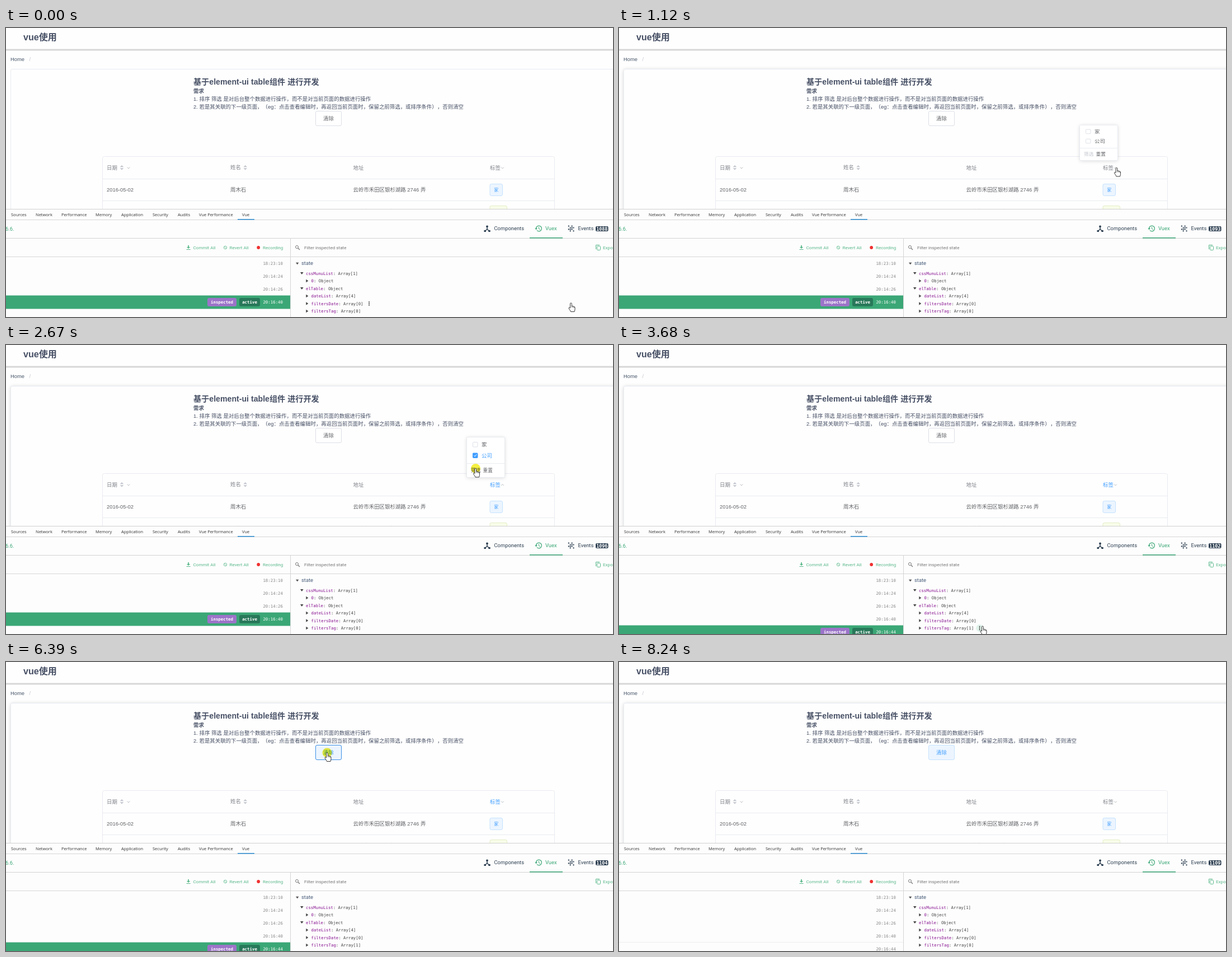
Animation, 1085 px wide and 516 px high, one loop 9110 ms. Source, as an HTML page with a canvas:

```html
<!DOCTYPE html>
<html lang="zh-CN">
<head>
<meta charset="utf-8">
<title>vue使用</title>
<style>
html, body { margin: 0; width: 100%; height: 100%; overflow: hidden; background: #fefefe; }
canvas { display: block; }
</style>
</head>
<body>
<canvas id="stage" width="1085" height="516"></canvas>
<script>
const W = 1085, H = 516, LOOP = 9110;
const ctx = document.getElementById('stage').getContext('2d');
const SANS = '"Liberation Sans", "Noto Sans CJK SC", sans-serif';
const UI = '"Open Sans", sans-serif';
const ROBOTO = 'Roboto, sans-serif';
const MONO = '"DejaVu Sans Mono", monospace';
const PAGE = '#fefefe', INK = '#475065', BODY = '#606266', HEAD = '#80838a';
const BLUE = '#409eff', GREEN = '#3ba776', SOFT_GREEN = '#5bb98c', NAVY = '#2c3e50';
const NAME = '周木石', ADDRESS = '云岭市禾田区银杉湖路 2746 弄';

// Moments of the interaction, in ms
const OPEN = 970, CHECK = 2050, COMMIT = 2900, CLEAR = 6470;

// Pointer track: time, x, y
const TRACK = [
  [70, 1010, 491], [640, 932, 321], [970, 889.5, 249.5],
  [1350, 889.5, 249.5], [1900, 839.5, 196.5],
  [2090, 839.5, 196.5], [2220, 840, 215], [2340, 840, 215], [2450, 839.5, 220.5],
  [3060, 839.5, 220.5], [3370, 655, 496], [3530, 650, 502],
  [3760, 650, 502], [4370, 962, 323], [4400, 962, 323], [4830, 881, 251],
  [4950, 881, 251], [5460, 574, 162], [6690, 574, 162],
  [7540, 625, 481], [7690, 625, 481], [8230, 703, 519]
];
const CLICKS = [[1970, 2050], [2660, 2900], [6380, 6470]];
const COUNTS = [
  [0, 1088], [300, 1089], [450, 1091], [970, 1092], [1050, 1093], [1980, 1094],
  [2050, 1096], [2900, 1098], [2990, 1100], [3150, 1102], [4450, 1103],
  [4600, 1104], [6540, 1106], [6770, 1108], [6920, 1109]
];

const HAND = new Path2D('M-1.5 9V1.3Q-1.5 0 -.1 0T1.3 1.3V5.5Q3 4.8 3.6 6Q5 5.4 5.6 6.7Q7.2 6.6 7 8.5V11Q7 12.5 6 15.5H-.5Q-1.5 13 -3.8 10Q-4.5 8.2 -3.3 8Q-2.4 8 -1.5 9Z');
const ARROW = new Path2D('M0 0V11.5L2.7 9L4.6 13.6L6.4 12.8L4.5 8.4H8Z');

const between = (v, a, b) => v >= a && v < b;

function pointer(t) {
  if (t <= TRACK[0][0]) return { x: TRACK[0][1], y: TRACK[0][2] };
  for (let i = 1; i < TRACK.length; i++) {
    const [t0, x0, y0] = TRACK[i - 1], [t1, x1, y1] = TRACK[i];
    if (t > t1) continue;
    const p = (t - t0) / (t1 - t0), e = p * p * (3 - 2 * p);
    return { x: x0 + (x1 - x0) * e, y: y0 + (y1 - y0) * e };
  }
  return { x: 703, y: 560 };
}

function rect(x, y, w, h, color) {
  ctx.fillStyle = color;
  ctx.fillRect(x, y, w, h);
}

function box(x, y, w, h, r, fill, border) {
  ctx.beginPath();
  ctx.roundRect(x, y, w, h, r);
  if (fill) { ctx.fillStyle = fill; ctx.fill(); }
  if (border) { ctx.strokeStyle = border; ctx.lineWidth = 1; ctx.stroke(); }
}

function text(str, x, y, size, color, font = SANS, weight = 400, align = 'left') {
  ctx.font = `${weight} ${size}px ${font}`;
  ctx.fillStyle = color;
  ctx.textAlign = align;
  ctx.fillText(str, x, y);
}

function line(color, width, ...pts) {
  ctx.strokeStyle = color;
  ctx.lineWidth = width;
  ctx.beginPath();
  for (let i = 0; i < pts.length; i += 2) ctx.lineTo(pts[i], pts[i + 1]);
  ctx.stroke();
}

function poly(color, ...pts) {
  ctx.fillStyle = color;
  ctx.beginPath();
  for (let i = 0; i < pts.length; i += 2) ctx.lineTo(pts[i], pts[i + 1]);
  ctx.fill();
}

function dot(x, y, r, color) {
  ctx.fillStyle = color;
  ctx.beginPath();
  ctx.arc(x, y, r, 0, 7);
  ctx.fill();
}

function ring(x, y, r, color, width = 1, from = 0, to = 2 * Math.PI) {
  ctx.strokeStyle = color;
  ctx.lineWidth = width;
  ctx.beginPath();
  ctx.arc(x, y, r, from, to);
  ctx.stroke();
}

function sorter(x) {
  poly('#c0c4cc', x - 3.3, 248.2, x, 245, x + 3.3, 248.2);
  poly('#c0c4cc', x - 3.3, 250.2, x, 253.4, x + 3.3, 250.2);
}

function chevron(x, up) {
  const d = up ? -1.2 : 1.2;
  line('#a8acb3', 0.8, x - 2.3, 249.8 - d, x, 249.8 + d, x + 2.3, 249.8 - d);
}

function drawPage(t, pos) {
  rect(0, 0, W, H, PAGE);
  text('vue使用', 31, 22, 16.1, INK, SANS, 700);
  rect(0, 37, W, 1, '#ececec');
  rect(0, 38, W, 2, '#d6d6d6');
  rect(0, 40, W, 1, '#ededed');
  text('Home', 8, 59, 9.4, '#48576a');
  text('/', 41.5, 59, 9.4, '#c0c4cc');

  ctx.save();
  if (t >= 650) {
    ctx.shadowColor = 'rgba(0,0,0,.18)';
    ctx.shadowBlur = 7;
    ctx.shadowOffsetY = 1;
  }
  box(8.5, 73.5, 1100, 600, 2.5, PAGE);
  ctx.restore();
  box(8.5, 73.5, 1100, 600, 2.5, null, '#e8ebf0');

  text('基于element-ui table组件 进行开发', 335, 101, 14.15, INK, SANS, 700);
  text('需求', 335, 116, 9.43, INK, SANS, 700);
  text('1. 排序 筛选 是对后台整个数据进行操作，而不是对当前页面的数据进行操作', 335, 130, 9.43, INK);
  text('2. 若是其关联的下一级页面，', 335, 144, 9.43, INK);
  text('（eg：点击查看编辑时，再返回当前页面时，保留之前筛选，或排序条件）', 458.6, 144, 9.43, INK);
  text('，否则清空', 770.9, 144, 9.43, INK);

  const over = between(pos.x, 553, 600) && between(pos.y, 148, 175);
  const lit = over || t >= CLEAR;
  const pressed = between(t, 6380, CLEAR);
  box(553.5, 148.5, 46, 26, 2.5, lit ? '#ecf5ff' : '#fff', pressed ? '#3a8ee6' : lit ? '#c6e2ff' : '#dcdfe6');
  text('清除', 576.5, 165.2, 9.43, lit ? BLUE : BODY, SANS, 400, 'center');
}

function drawTable(t) {
  const filtered = between(t, CHECK, CLEAR);
  box(172.5, 229.5, 808, 200, 3, null, '#e9ebef');
  rect(173, 269, 808, 1, '#e9ebef');
  rect(173, 308, 808, 1, '#e9ebef');
  text('日期', 180, 252.7, 9.43, HEAD, SANS, 500);
  text('姓名', 401, 252.3, 9.43, HEAD, SANS, 500);
  text('地址', 620.5, 252.7, 9.43, HEAD, SANS, 500);
  text('标签', 865, 252.7, 9.43, filtered ? BLUE : HEAD, SANS, 500);
  sorter(207);
  sorter(427.7);
  chevron(219, false);
  chevron(887.5, between(t, 1050, COMMIT));

  ['2016-05-02', '2016-05-04'].forEach((date, i) => {
    const y = 292 + i * 39;
    text(date, 180, y, 9.4, BODY);
    text(NAME, 401, y, 9.43, BODY);
    text(ADDRESS, 620.5, y, 9.43, BODY);
  });
  box(865, 278.5, 22.5, 21, 2.5, '#ecf5ff', '#c6e2ff');
  text('家', 876.3, 292, 8, BLUE, SANS, 400, 'center');
  box(865, 317.5, 30.5, 21, 2.5, '#f8fde9', '#e2eec6');
}

function drawPopup(t) {
  if (!between(t, 1040, 2985)) return;
  const p = Math.min(1, (t - OPEN) / 300);
  const out = Math.max(0, (t - COMMIT) / 90);
  const scale = (1 - (1 - p) ** 3) * (1 - out * 0.6);
  const checked = t >= CHECK;
  ctx.save();
  ctx.globalAlpha = Math.min(1, 0.2 + scale) * (1 - out);
  ctx.translate(0, 236);
  ctx.scale(1, scale);
  ctx.translate(0, -236);
  ctx.save();
  ctx.shadowColor = 'rgba(0,0,0,.14)';
  ctx.shadowBlur = 7;
  ctx.shadowOffsetY = 1;
  box(823.5, 164.5, 68, 72, 1.5, '#fff');
  ctx.restore();
  box(823.5, 164.5, 68, 72, 1.5, null, '#e8eaef');
  box(834.5, 173.5, 8.5, 8.5, 1, '#fff', '#dcdfe6');
  box(834.5, 193, 8.5, 8.5, 1, checked ? BLUE : '#fff', checked ? BLUE : '#dcdfe6');
  if (checked) line('#fff', 1, 836.5, 197.2, 838.2, 199, 841.3, 195.2);
  text('家', 850, 181.3, 9.43, BODY);
  text('公司', 850, 200.8, 9.43, checked ? BLUE : BODY);
  rect(824, 211, 67, 1, '#e9ebef');
  text('筛选', 831, 227.2, 8.7, checked ? BODY : '#c0c4cc');
  text('重置', 852.5, 227.2, 8.7, BODY);
  ctx.restore();
}

function drawTabs(t) {
  rect(0, 323, W, 200, '#fdfdfd');
  rect(0, 323, W, 1, '#cfcfcf');
  const tabs = { Sources: 9, Network: 53, Performance: 99, Memory: 160, Application: 206, Security: 262, Audits: 307, 'Vue Performance': 345, Vue: 422 };
  for (const name in tabs) text(name, tabs[name], 336.2, 7.5, '#333', UI);
  rect(0, 342, W, 1, '#d6d6d6');
  rect(414, 341, 30, 1.5, '#2f8fd3');

  text('6.6.', -1, 362, 9.4, GREEN, ROBOTO);
  text('Components', 872.5, 361.3, 9.4, NAVY, ROBOTO);
  text('Vuex', 964, 361.3, 9.4, GREEN, ROBOTO);
  text('Events', 1022.5, 361.3, 9.4, NAVY, ROBOTO);

  line(NAVY, 1.4, 856, 363, 860, 359, 864, 363);
  line(NAVY, 1.4, 860, 359, 860, 354);
  dot(860, 354.3, 1.9, NAVY);
  rect(854.5, 361, 3.4, 3, NAVY);
  rect(862.3, 361, 3.4, 3, NAVY);

  ring(952.5, 358, 4.9, GREEN, 1.2, -Math.PI, 2.4);
  poly(GREEN, 945.3, 357.5, 950, 357.5, 947.6, 360.2);
  line(GREEN, 1, 952.5, 355.3, 952.5, 358.5, 954.8, 360);

  for (let r = 0; r < 4; r++)
    for (let c = 0; c < 4; c++)
      if ((r + c) % 2 === 0 || (r % 3 && c % 3)) dot(1005.8 + c * 2.9, 353.7 + r * 2.9, 1.15, NAVY);

  const count = COUNTS.filter(c => t >= c[0]).pop()[1];
  box(1054, 354, 22.5, 9, 2, NAVY);
  text(count, 1065.3, 361.6, 8.3, '#fff', MONO, 700, 'center');
  rect(0, 375, W, 1, '#d4d4d4');
  rect(936, 374, 59, 1.5, GREEN);
}

function drawToolbar() {
  rect(325.2, 388, 1.8, 3.5, SOFT_GREEN);
  poly(SOFT_GREEN, 323, 391, 329.2, 391, 326.1, 394);
  rect(322.5, 395, 7.2, 1, SOFT_GREEN);
  text('Commit All', 334.5, 395, 8.1, SOFT_GREEN, ROBOTO);
  ring(392, 392, 2.7, SOFT_GREEN, 0.8);
  line(SOFT_GREEN, 0.8, 390.2, 390.2, 393.8, 393.8);
  text('Revert All', 399.5, 395, 8.1, SOFT_GREEN, ROBOTO);
  dot(451.2, 392, 2.9, '#f03030');
  text('Recording', 459, 395, 8.1, SOFT_GREEN, ROBOTO);
  ring(520, 391, 2.5, '#777', 1);
  line('#777', 1.2, 522, 393, 525, 396);
  text('Filter inspected state', 533, 395, 8.1, '#777', ROBOTO);
  box(1056.5, 389.5, 6, 7, 1, null, SOFT_GREEN);
  line(SOFT_GREEN, 1, 1054.5, 395, 1054.5, 387.5, 1061, 387.5);
  text('Export', 1067, 395, 8.1, SOFT_GREEN, ROBOTO);
  rect(0, 408, W, 1, '#d8d8d8');
}

function drawHistory(t) {
  const times = ['18:23:10', '20:14:24', '20:14:26', '20:16:40', '20:16:44'];
  const active = t < COMMIT ? 3 : t < CLEAR ? 4 : 5;
  times.slice(0, active + 1).forEach((time, i) => {
    const y = 420.5 + i * 23, on = i === active;
    if (on) {
      rect(0, y - 12, 508, 24, GREEN);
      box(360, y - 7.5, 52, 15, 3, '#9c74c9');
      text('inspected', 386, y + 2.4, 7.4, '#fff', MONO, 700, 'center');
      box(417, y - 7.5, 37, 15, 3, '#28785a');
      text('active', 435.5, y + 2.4, 7.4, '#fff', MONO, 700, 'center');
    }
    text(time, 495, y + 2.4, 7.4, on ? '#fff' : '#888', MONO, 400, 'right');
  });
  if (active === 5) rect(0, 500, 508, 1, '#eeeeee');
  rect(508, 376, 1, 140, '#d4d4d4');
}

function drawState(t, pos) {
  poly('#555', 518, 418.7, 523.4, 418.7, 520.7, 422.6);
  text('state', 528, 423.2, 9.4, '#455a78', ROBOTO);
  const tags = between(t, COMMIT, CLEAR) ? 1 : 0;
  const rows = [
    [0, 'cssMunuList', 'Array[1]'], [1, '0', 'Object'], [0, 'elTable', 'Object'],
    [1, 'dateList', 'Array[4]'], [1, 'filtersDate', 'Array[0]'], [1, 'filtersTag', `Array[${tags}]`]
  ];
  rows.forEach(([depth, key, value], i) => {
    const y = 438 + i * 13.5, x = 536 + depth * 9.5, a = x - 7.2;
    if (depth) poly('#444', a - 2, y - 2.8, a + 2, y, a - 2, y + 2.8);
    else poly('#444', a - 2.8, y - 1.9, a + 2.8, y - 1.9, a, y + 2);
    text(key, x, y + 2.5, 7.37, '#881391', MONO);
    const keyWidth = ctx.measureText(key).width;
    text(': ' + value, x + keyWidth, y + 2.5, 7.37, '#444', MONO);
    const end = x + keyWidth + ctx.measureText(': ' + value).width + 10.5;
    if (pos.x < 509 || Math.abs(pos.y - y) > 6.75) return;
    if (Math.abs(pos.x - end) < 7) dot(end, y, 6.5, '#e0f2ea');
    for (let d = -1; d < 2; d++) dot(end, y + d * 2.7, 0.95, '#333');
  });
}

function isHand(t, { x, y }) {
  return y > 410 ||
    (between(y, 343, 376) && x > 840) ||
    (between(x, 885, 896) && between(y, 243, 256)) ||
    (between(x, 553, 600) && between(y, 148, 175)) ||
    (between(t, 1050, COMMIT) && between(x, 824, 891) && between(y, 164, 236));
}

function drawPointer(t, pos) {
  if (CLICKS.some(([a, b]) => between(t, a, b))) {
    ctx.save();
    ctx.globalCompositeOperation = 'multiply';
    dot(pos.x, pos.y, 8.5, '#f5f042');
    ctx.restore();
  }
  const shape = isHand(t, pos) ? HAND : ARROW;
  ctx.save();
  ctx.translate(pos.x, pos.y);
  ctx.fillStyle = '#fff';
  ctx.fill(shape);
  ctx.strokeStyle = '#222';
  ctx.lineWidth = 0.9;
  ctx.lineJoin = 'round';
  ctx.stroke(shape);
  if (shape === HAND) {
    line('#222', 0.7, 1.4, 5.5, 1.4, 8);
    line('#222', 0.7, 3.6, 6, 3.6, 8.2);
    line('#222', 0.7, 5.5, 6.7, 5.5, 8.6);
  }
  ctx.restore();
}

function frame(now) {
  const t = now % LOOP, pos = pointer(t);
  drawPage(t, pos);
  drawTable(t);
  drawPopup(t);
  drawTabs(t);
  drawToolbar();
  drawHistory(t);
  drawState(t, pos);
  drawPointer(t, pos);
}

const start = performance.now();
function tick() {
  frame(performance.now() - start);
  requestAnimationFrame(tick);
}
tick();
</script>
</body>
</html>
```
